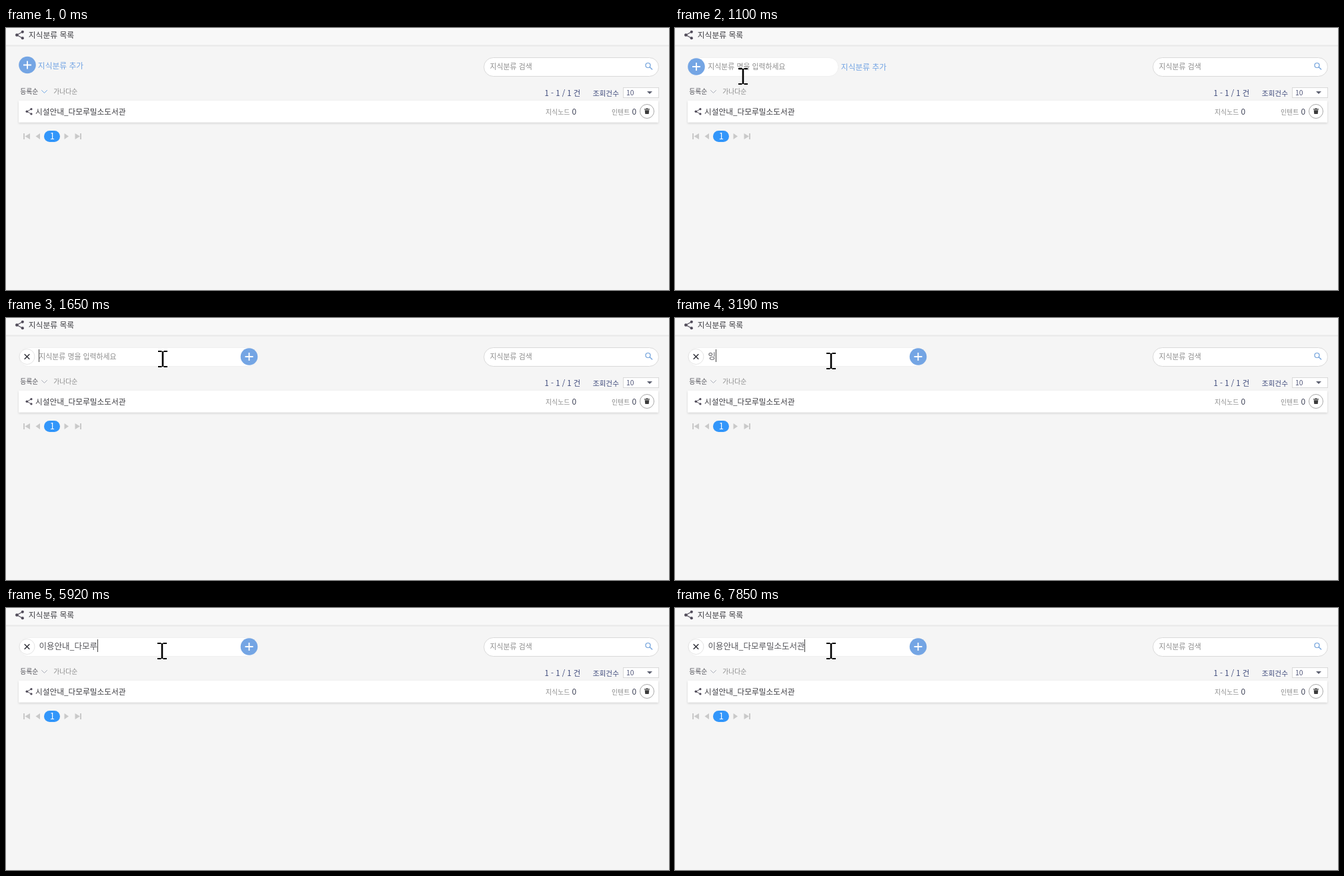
These frames come from a looping animation (994 px wide and 393 px high, 8000 ms). An HTML page:

```html
<!DOCTYPE html>
<html lang="ko">
<head>
<meta charset="utf-8">
<style>
html, body { margin: 0; width: 100%; height: 100%; overflow: hidden; background: #f5f5f5; }
svg { display: block; }
text { font-family: "Noto Sans CJK KR", "Noto Sans CJK", "Noto Sans", sans-serif; white-space: pre; }
.dark { fill: #3d3d42; }
.gray { fill: #8c8c8c; }
.navy { fill: #3f4b7c; font-weight: 500; }
.count { fill: #3c4055; font-weight: 500; }
.blue { fill: #74a5e4; }
.line { fill: none; stroke-linecap: round; }
</style>
</head>
<body>
<svg width="994" height="393" viewBox="0 0 994 393">
  <defs>
    <filter id="soft" x="-5%" y="-30%" width="110%" height="170%">
      <feDropShadow dx="0" dy="1.5" stdDeviation="1.5" flood-opacity=".15"/>
    </filter>
    <g id="share" fill="#514c5a" stroke="#514c5a">
      <path d="M8.5 -4.7L0 0L8.5 4.7" fill="none" stroke-width="1.2"/>
      <g stroke="none"><circle r="2.3"/><circle cx="8.5" cy="-4.7" r="2.1"/><circle cx="8.5" cy="4.7" r="2.1"/></g>
    </g>
    <g id="plus">
      <circle r="12.8" class="blue"/>
      <path d="M-6 0H6M0 -6V6" stroke="#fff" stroke-width="1.8"/>
    </g>
  </defs>

  <!-- header -->
  <rect width="994" height="25.5" fill="#f8f8f8"/>
  <rect y="25.5" width="994" height="2" fill="#e9e9e9"/>
  <use href="#share" x="16.3" y="10.5"/>
  <text x="33.7" y="14.5" font-size="11.8" class="dark">지식분류 목록</text>

  <!-- search -->
  <rect x="716.5" y="44.5" width="262" height="28" rx="14" fill="#fff" stroke="#d9d9d9"/>
  <text x="725.5" y="62" font-size="10.9" class="gray">지식분류 검색</text>
  <g class="line" stroke="#6d9fda" stroke-width="1.2"><circle cx="962.5" cy="56" r="3.5"/><path d="M965.3 58.8L968.7 62"/></g>

  <!-- sorting and count -->
  <text x="21.3" y="99" font-size="9.8" fill="#505057">등록순</text>
  <path id="chevron" d="M53.5 93.5l4 4l4 -4" class="line" stroke-width="1"/>
  <text x="71.3" y="99" font-size="9.8" class="gray">가나다순</text>
  <text x="807.5" y="101.5" font-size="11.4" class="navy">1 - 1 / 1 건</text>
  <text x="879.7" y="101.5" font-size="10.7" class="navy">조회건수</text>
  <rect x="925.5" y="89.5" width="53" height="15" fill="#fff" stroke="#d9d9d9"/>
  <text x="930" y="100.5" font-size="10.3" fill="#4c5275">10</text>
  <path d="M961 95h8l-4 4z" fill="#5d6070"/>

  <!-- list row -->
  <rect x="19" y="109" width="959" height="32.5" fill="#fff" filter="url(#soft)"/>
  <use href="#share" transform="translate(31.3 125.3) scale(.78)"/>
  <text x="43.9" y="129.7" font-size="11.7" class="dark">시설안내_다모루밀소도서관</text>
  <text x="809" y="129.5" font-size="9.9" class="gray">지식노드</text>
  <text x="848.5" y="130" font-size="12" class="count">0</text>
  <text x="908" y="129.5" font-size="9.9" class="gray">인텐트</text>
  <text x="938.5" y="130" font-size="12" class="count">0</text>
  <circle cx="961" cy="125" r="10.5" fill="#fff" stroke="#a9a9a9"/>
  <path d="M957 121.2h2.5l.7 -1h1.6l.7 1h2.5v1.3h-8zM957.7 123.3h6.6l-.6 5.7h-5.4z" fill="#3c3c3c"/>

  <!-- pages -->
  <g fill="#c9c9c9">
    <path d="M26 158h2v9h-2zM36 158v9l-7.5 -4.5zM51 158v9l-6.5 -4.5z"/>
    <path d="M87.5 158v9l6.5 -4.5zM103.5 158v9l7.5 -4.5zM111 158h2v9h-2z"/>
  </g>
  <rect x="57" y="154" width="24" height="17" rx="8.5" fill="#3296fa"/>
  <text x="69.3" y="167.3" font-size="13" fill="#fff" text-anchor="middle">1</text>

  <!-- add field -->
  <rect id="field" x="19.5" y="44.5" height="28" rx="14" fill="#fff" stroke="#efefef"/>
  <text id="hint" x="49.3" y="62" font-size="10.9" class="gray">지식분류 명을 입력하세요</text>
  <text id="typed" x="49.5" y="61.7" font-size="12.5" fill="#55555a"></text>
  <rect id="caret" y="47" width="1" height="19" fill="#444"/>
  <g id="close" transform="translate(31.5 58)">
    <circle r="11.5" fill="#fff" stroke="#e4e4e4"/>
    <path d="M-3.8 -3.8l7.6 7.6M3.8 -3.8l-7.6 7.6" stroke="#33343c" stroke-width="1.5"/>
  </g>
  <use id="add" href="#plus"/>
  <text id="label" font-size="11.8" class="blue">지식분류 추가</text>

  <!-- cursors -->
  <g id="cursor">
    <path id="arrow" d="M0 0V24L5.5 19L9 27L13 25.3L9.5 17.5H17z" fill="#fff" stroke="#000"/>
    <path id="hand" d="M-2 1.5Q0 -1 2 1.5V10Q5 8 6.5 10.5Q9 9 10.5 11.5Q13 10.5 14 13V20L11 27H0L-6.5 17Q-7 13.5 -4 14L-2 16z" fill="#fff" stroke="#000" stroke-width="1.2"/>
    <g id="beam" fill="none" stroke="#000">
      <path d="M0 -11.5V11.5" stroke-width="2.6"/>
      <path d="M-7 -11.5h5.5M1.5 -11.5h5.5M-7 11.5h5.5M1.5 11.5h5.5" stroke-width="2"/>
    </g>
  </g>
</svg>
<script>
const LOOP = 8000;
const el = Object.fromEntries([...document.querySelectorAll("svg > [id], #cursor > [id]")].map(e => [e.id, e]));

// Each key press: time, finished text, syllables being composed
const A = "이용", B = "이용안내_", C = B + "다모루밀소";
const keys = [
  [2840, "", "ㅇ"], [3050, "", "이"], [3190, "", "잉"], [3320, "", "이요"], [3510, A, ""],
  [3710, A, "ㅇ"], [3850, A, "아"], [3980, A, "안"], [4310, A, "안ㄴ"], [4450, A, "안내"],
  [5050, B, ""], [5320, B, "ㄷ"], [5390, B, "다"], [5590, B, "담"], [5720, B, "다모"],
  [5790, B, "다몰"], [5920, B, "다모루"], [6050, B, "다모룸"], [6110, B, "다모루미"],
  [6250, B, "다모루밀"], [6470, B, "다모루밄"], [6520, C, ""], [6790, B, "다모루밀솓"],
  [6920, C, "도"], [7060, C, "돗"], [7130, C, "도서"], [7260, C, "도석"],
  [7460, C, "도서고"], [7650, C, "도서과"], [7850, C, "도서관"]
];

// Pointer route: time, x, y
const route = [[130, 755, 385], [620, 30, 63], [820, 30, 63], [1100, 102, 72.5], [1590, 235, 61.5], [1650, 235, 61.5], [1850, 234, 64.5]];

const mix = (a, b, p) => a + (b - a) * p;
const ease = p => { p = Math.min(1, Math.max(0, p)); return p * p * (3 - 2 * p); };
const show = (e, on) => e.style.display = on ? "" : "none";
const place = (e, x, y) => e.setAttribute("transform", `translate(${x} ${y})`);
const snap = (t, from) => from + Math.floor((t - from) / 70) * 70;

function pointer(t) {
  const i = route.findIndex(r => r[0] > t);
  if (i < 0) return route.at(-1).slice(1);
  if (i == 0) return route[0].slice(1);
  const [a, b] = [route[i - 1], route[i]];
  const p = ease((t - a[0]) / (b[0] - a[0]));
  return [mix(a[1], b[1], p), mix(a[2], b[2], p)];
}

function draw(now) {
  const t = now % LOOP;
  const q = t < 820 ? snap(t, 130) : t < 1590 ? snap(t, 820) : t;
  const open = t < 820 ? 0 : ease((q - 750) / 210), wide = ease((q - 1310) / 210);
  const editing = q >= 1310, ready = q >= 1520;
  const shift = 201 * open + 132 * wide;

  show(el.field, open);
  el.field.setAttribute("width", 24.5 + shift);
  place(el.add, ready ? 364.5 : 32, 55.5 + 2.5 * open);
  show(el.add, !editing || ready);
  show(el.close, editing);
  place(el.label, 47.8 + shift, 61 + 2 * open);
  show(el.label, !ready);
  el.chevron.setAttribute("stroke", t < 820 ? "#74a9e6" : "#a9adb8");

  const key = keys.findLast(k => k[0] <= t);
  el.typed.textContent = key ? key[1] + key[2] : "";
  el.hint.style.opacity = key ? 0 : open;
  const end = key ? el.typed.getComputedTextLength() : 0;
  el.caret.setAttribute("x", Math.floor(49.5 + end));
  const idle = t - (key ? key[0] : 1850);
  show(el.caret, t >= 1650 && (idle < 530 || idle >= 1060));

  place(el.cursor, ...pointer(q));
  show(el.cursor, t >= 130);
  show(el.arrow, q < 620);
  show(el.hand, q >= 620 && q < 960);
  show(el.beam, q >= 960);
}

const start = performance.now();
function tick() {
  draw(performance.now() - start);
  requestAnimationFrame(tick);
}
tick();
</script>
</body>
</html>
```
